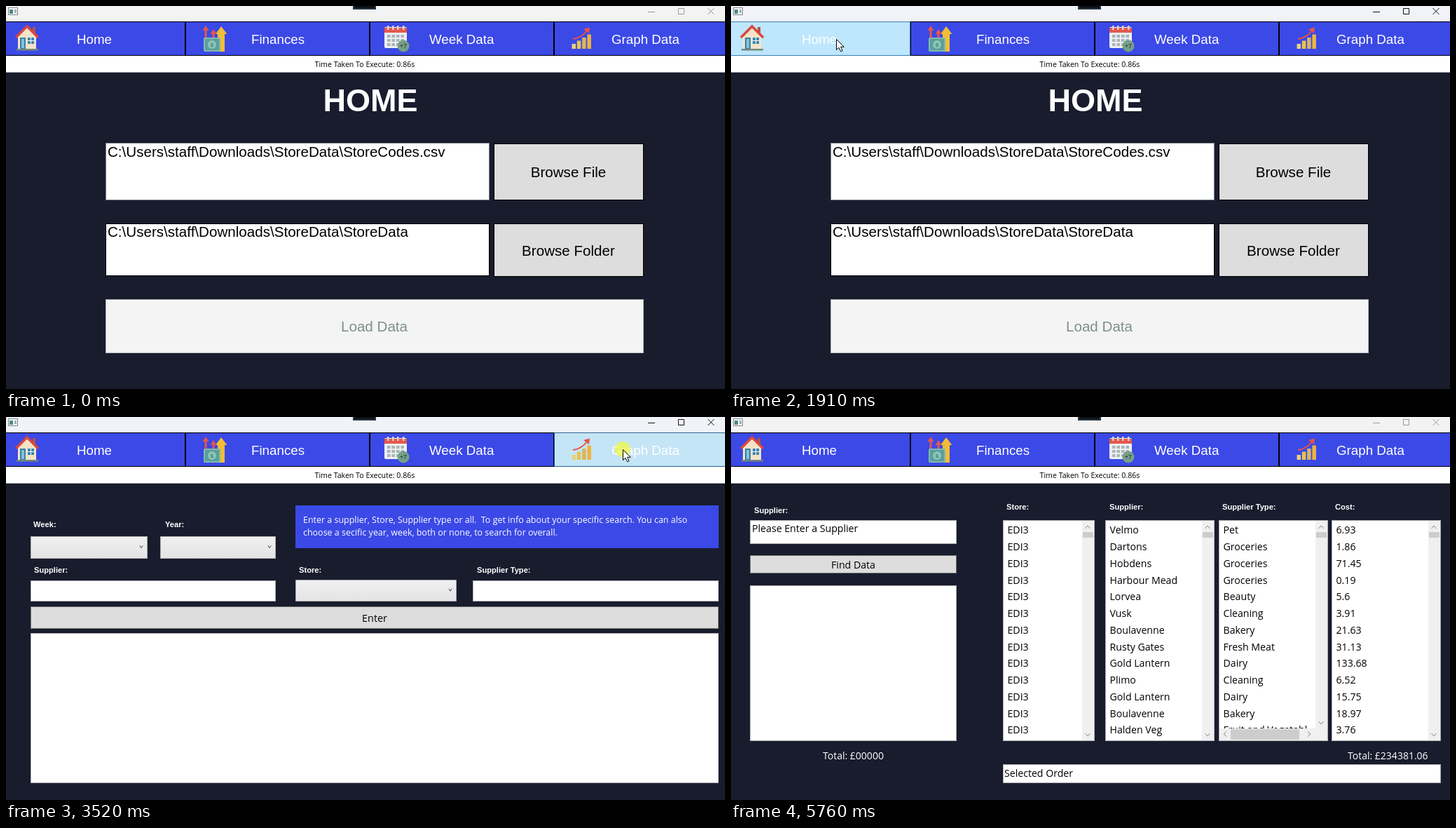
Write an HTML page that moves like this. It is 1026x546 px and loops after 5.82 s.

```html
<!DOCTYPE html>
<html lang="en">
<head>
<meta charset="utf-8">
<title>Store data app</title>
<style>
  html, body { margin: 0; width: 100%; height: 100%; overflow: hidden; background: #181c2d; }
  svg { display: block; }
  text { white-space: pre; }
  .ui { font-family: "Open Sans", "Noto Sans", sans-serif; }
  .arial { font-family: "Liberation Sans", Arial, sans-serif; }
  .bold { font-weight: bold; }
</style>
</head>
<body>
<svg id="stage" width="1026" height="546" viewBox="0 0 1026 546">
  <defs>
    <linearGradient id="combo" x2="0" y2="1">
      <stop stop-color="#f0f0f0"/><stop offset="1" stop-color="#e4e4e4"/>
    </linearGradient>
  </defs>
</svg>
<script>
const LOOP = 5820, STEPS = 88;
const BLUE = '#3b49e6', WHITE = '#fff', BLACK = '#000', GREY = '#ddd';
const stage = document.getElementById('stage');

// Drawing helpers: boxes take outer edges, text takes the middle of its capitals.
const fill = (x, y, w, h, color, extra = '') =>
  `<rect x="${x}" y="${y}" width="${w}" height="${h}" fill="${color}" ${extra}/>`;
const box = (x1, y1, x2, y2, color = WHITE, border = '#abadb3', extra = '') =>
  fill(x1 + .5, y1 + .5, x2 - x1 - 1, y2 - y1 - 1, color, `stroke="${border}" ${extra}`);
const path = (d, stroke, width = 1, color = 'none') =>
  `<path d="${d}" fill="${color}" stroke="${stroke}" stroke-width="${width}"/>`;
const shape = (d, color) => `<path d="${d}" fill="${color}"/>`;
const text = (x, y, string, size = 14.15, color = BLACK, style = 'ui', anchor = 'start') =>
  `<text x="${x}" y="${y}" dy=".36em" font-size="${size}" fill="${color}" class="${style}" text-anchor="${anchor}">${string}</text>`;
const arial = (x, y, string, size, color, anchor) => text(x, y, string, size, color, 'arial', anchor);
const label = (x, y, string) => text(x, y, string, 11.15, WHITE, 'arial bold');
const button = (x1, y1, x2, y2, string, size) =>
  box(x1, y1, x2, y2, GREY, '#707070') + text((x1 + x2) / 2, (y1 + y2) / 2 + 1, string, size, BLACK, 'ui', 'middle');
const chevron = (x, y, dx, dy, color = '#888', half = 3.5) => dx
  ? path(`M${x - dx / 2} ${y - half}l${dx} ${half}l${-dx} ${half}`, color)
  : path(`M${x - half} ${y - dy / 2}l${half} ${dy}l${half} ${-dy}`, color);
const combo = (x1, y1, x2, y2) =>
  box(x1, y1, x2, y2, 'url(#combo)', '#acacac') + chevron(x2 - 9, (y1 + y2) / 2 - 1, 0, 3.5, '#444', 2.2);
const note = (x1, y1, x2, y2, left, top, pitch, size, lines) =>
  fill(x1, y1, x2 - x1, y2 - y1, BLUE) +
  lines.map((line, i) => text(left, top + i * pitch, line, size, WHITE)).join('');

function list(x1, x2, rows, wide) {
  const bar = x2 - 18, bottom = wide ? 444 : 461;
  let out = box(x1, 147, x2, 462);
  rows.forEach((row, i) => out += text(x1 + 6.5, 161.3 + i * 23.75, row));
  out += fill(bar, 148, 17, bottom - 148, '#f0f0f0') + fill(bar + 1, 164, 15, 8, '#cdcdcd') +
    chevron(bar + 8, 157, 0, -4) + chevron(bar + 8, bottom - 8, 0, 4);
  if (wide) out += fill(x1 + 1, 444, x2 - x1 - 2, 17, '#f0f0f0') + fill(713, 445, 98, 15, '#cdcdcd') +
    chevron(705, 452, -4, 0) + chevron(825, 452, 4, 0);
  return out;
}

const icons = [
  shape('M17 43L30 30L43 43V62H17Z', '#f3e3c8') + fill(38, 30, 4, 9, '#b5524a') +
    path('M14 45L30 29L46 45', '#d9473f', 3.5) + fill(20, 45, 8, 16, '#3a7fa5') + fill(22, 47, 4, 13, '#7ec4dd') +
    fill(31, 45, 9, 9, '#3d86b0') + path('M35.5 45v9M31 49.5h9', WHITE) + fill(15, 61, 31, 2.5, '#75877d'),
  shape('M302 65V40h-3L307 29L315.5 40h-3.500V65Z', '#f2bd35') +
    shape('M283.5 45V35h-3L285 28L289.500 35h-3V45ZM294.500 45V40h-3L296 33L300.500 40h-3V45Z', '#e4574c') +
    fill(282, 45, 24, 20, '#7fb9ae', 'rx="2"') + fill(284, 47, 20, 16, '#5d9e9b') +
    '<circle cx="294" cy="55" r="6" fill="#8ac6b6"/>' + text(294, 55, '$', 8, '#2f6f78', 'arial', 'middle'),
  fill(540, 30, 32, 30, '#eceff2', 'rx="2"') + fill(540, 31, 32, 7, '#e4584c') +
    [544, 551, 558, 566].map(x => fill(x, 28, 2.5, 6, '#dfd3d0')).join('') +
    [0, 1, 2].map(r => [0, 1, 2, 3].map(c => fill(544 + c * 6.5, 41 + r * 6, 4.5, 4, '#a9b4b6')).join('')).join('') +
    '<circle cx="567" cy="57" r="8.500" fill="#76a088"/>' + text(567, 57, '+7', 9, '#1c2b2c', 'arial', 'middle'),
  ['#e8d27c', '#e9c34b', '#d9b565', '#efb43e'].map((color, i) =>
    fill(807.5 + i * 7.3, 54 - i * 4.5, 5.5, 7 + i * 4.5, color)).join('') +
    path('M809 47C818 46 824 42 830 34', '#e65348', 2) + shape('M824 33L833 30.500L832 39Z', '#e65348')
];
const tabs = [[-1, 256, 'Home', 101], [256, 519, 'Finances', 350], [519, 782, 'Week Data', 604], [782, 1027, 'Graph Data', 864]];
const header =
  '<rect id="title" width="1026" height="23"/>' +
  box(3, 2, 17, 13, '#f7f9fa', '#7d8790') + fill(5, 5, 5, 6, '#4b8c80') + fill(12, 5, 3, 5, '#a5b0b8') +
  fill(495, 0, 33, 5, '#263442') + fill(497, 0, 29, 3, '#0c1118') +
  '<g id="controls" fill="none"><path d="M916 8.500h10M959.500 3.500h8v8h-8zM1001.500 3l9 9M1010.500 3l-9 9"/></g>' +
  tabs.map(([x1, x2, name, x], i) =>
    box(x1, 22, x2, 71, BLUE, BLACK, `id="tab${i}"`) + icons[i] + arial(x, 47, name, 18.75, WHITE)).join('') +
  fill(0, 71, 1026, 23, WHITE) + fill(0, 94, 1026, 1, '#abadb3') +
  text(512, 83.5, 'Time Taken To Execute: 0.86s', 10.6, BLACK, 'ui', 'middle');

const folder = 'C:\\Users\\staff\\Downloads\\StoreData\\';
const hotBoxes = [
  [142, 195, 690, 277, '#707b80'], [142, 310, 690, 385, BLACK],
  [696, 196, 910, 277, BLACK, true], [696, 310, 910, 386, BLACK, true]
];
const home =
  text(520, 134, 'HOME', 45, WHITE, 'arial bold', 'middle') +
  hotBoxes.map(([x1, y1, x2, y2, border, isButton], i) =>
    box(x1, y1, x2, y2, isButton ? GREY : WHITE, border, `id="hot${i}"`)).join('') +
  arial(145, 208, folder + 'StoreCodes.csv', 20.6, BLACK) + arial(145, 322, folder + 'StoreData', 20.6, BLACK) +
  arial(802.5, 237, 'Browse File', 20.6, BLACK, 'middle') + arial(802.5, 348.5, 'Browse Folder', 20.6, BLACK, 'middle') +
  box(142, 418, 910, 495, '#f4f4f4', '#adb2b5') + arial(525.5, 457, 'Load Data', 20.6, '#7f9187', 'middle');

const suppliers = ['Velmo', 'Dartons', 'Hobdens', 'Harbour Mead', 'Lorvea', 'Vusk', 'Boulavenne', 'Rusty Gates',
  'Gold Lantern', 'Plimo', 'Gold Lantern', 'Boulavenne', 'Halden Veg'];
const types = ['Pet', 'Groceries', 'Groceries', 'Groceries', 'Beauty', 'Cleaning', 'Bakery', 'Fresh Meat',
  'Dairy', 'Cleaning', 'Dairy', 'Bakery', 'Fruit and Vegetabl'];
const costs = [6.93, 1.86, 71.45, 0.19, 5.6, 3.91, 21.63, 31.13, 133.68, 6.52, 15.75, 18.97, 3.76];
const finances =
  label(33, 133, 'Supplier:') + box(27, 147, 322, 181) + text(30, 158.5, 'Please Enter a Supplier') +
  button(27, 197, 322, 223, 'Find Data') + box(27, 240, 322, 462) + text(131, 483, 'Total: £00000', 14, WHITE) +
  label(393, 128, 'Store:') + label(540, 128, 'Supplier:') + label(701, 128, 'Supplier Type:') + label(862, 128, 'Cost:') +
  list(388, 519, suppliers.map(() => 'EDI3')) + list(534, 690, suppliers) + list(696, 852, types, true) + list(857, 1013, costs) +
  text(880, 483, 'Total: £234381.06', 14, WHITE) + box(388, 495, 1013, 522) + text(390, 507.5, 'Selected Order');

const week =
  label(39, 153, 'Week:') + label(227, 153, 'Year:') + combo(35, 170, 202, 202) + combo(220, 170, 385, 202) +
  note(413, 126, 1017, 187, 424, 147, 18, 12.47, [
    'Enter a supplier, Store, Supplier type or all.  To get info about your specific search. You can also',
    'choose a secific year, week, both or none, to search for overall.']) +
  label(40, 218, 'Supplier:') + label(418, 218, 'Store:') + label(672, 218, 'Supplier Type:') +
  box(35, 233, 385, 263) + combo(413, 232, 643, 263) + box(666, 233, 1017, 263) +
  button(35, 270, 1017, 302, 'Enter', 14.4) + box(35, 308, 1017, 522);

const ticks = ['0.08000000000000002', '0.06000000000000001', '0.04000000000000001', '0.020000000000000007',
  '6.938893903907228E-18', '-0.019999999999999993', '-0.039999999999999994', '-0.06', '-0.08', '-0.1'];
const tickY = i => Math.round(246 + i * 32.9) - .5;
const graph =
  label(26, 136, 'Store:') + label(198, 136, 'Week:') + label(373, 133, 'Year:') +
  combo(21, 149, 188, 178) + combo(192, 149, 360, 178) + combo(366, 149, 533, 178) + button(547, 149, 781, 178, 'Enter', 10.6) +
  ticks.map((tick, i) => path(`M150 ${tickY(i)}H781`, '#e8e8ec') +
    text(147, tickY(i) + .5, tick, 9.2, '#b4b5bb', 'ui', 'end')).join('') +
  [0, 1, 2, 3, 4].map(i => path(`M${Math.round(150 + i * 157.5) + .5} 212.5V542`, '#e8e8ec')).join('') +
  `<g transform="translate(36 377) rotate(-90)">${text(0, 0, 'Incom in £', 9.2, '#b4b5bb', 'ui', 'middle')}</g>` +
  note(800, 205, 1026, 299, 811, 222.5, 15, 10.65, ['The graph week axis (x), start at an',
    'index of 0. This means the week that', 'disaplys is actually plus 1. E.g week 0 is', 'actually week 1.']) +
  note(800, 315, 1026, 409, 811, 332.5, 15, 10.65, ['If you select nothing on the week or',
    'year drop down, it will show results', 'without a specific year or week.']);

const pages = { home, finances, week, graph };
stage.innerHTML += fill(0, 0, 1026, 546, '#181c2d') +
  Object.entries(pages).map(([name, content]) => `<g id="${name}">${content}</g>`).join('') + header +
  '<g id="cursor"><circle id="click" r="11" fill="#ffff00" fill-opacity=".55"/>' +
  path('M.5 .5V15.5L4 12.3L6.5 17.8L9 16.7L6.6 11.3H11.3Z', BLACK, 1, WHITE) + '</g>';

// Pointer stops as [step, x, y]; clicks as [first step, last step].
const route = [[2, 965, 536], [10, 440, 92], [12, 402, 56], [17, 395, 52], [20, 394, 51], [24, 150, 48], [28, 140, 47],
  [29, 150, 47], [33, 330, 46], [35, 343, 46], [37, 352, 46], [42, 605, 46], [45, 618, 46], [46, 620, 46],
  [51, 880, 46], [55, 880, 46], [60, 517, 57], [62, 423, 50], [67, 422, 49], [76, 422, 49], [82, 983, 542]];
const clicks = [[14, 14], [25, 26], [33, 33], [43, 43], [53, 54], [74, 75]];
const pageStarts = [[0, 'home'], [15, 'finances'], [27, 'home'], [34, 'finances'], [44, 'week'], [55, 'graph'], [76, 'finances']];

const byId = id => document.getElementById(id);
const setAttributes = (id, values) => {
  for (const name in values) byId(id).setAttribute(name, values[name]);
};
const show = (id, visible) => setAttributes(id, { display: visible ? 'inline' : 'none' });

function pointerAt(step) {
  const next = route.findIndex(stop => stop[0] >= step);
  if (next < 0 || step < route[0][0]) return null;
  if (next === 0) return route[0].slice(1);
  const [a, ax, ay] = route[next - 1], [b, bx, by] = route[next];
  const part = (step - a) / (b - a);
  return [ax + (bx - ax) * part, ay + (by - ay) * part];
}

function draw(time) {
  const step = Math.floor(time / LOOP * STEPS + .2) % STEPS;
  const pointer = pointerAt(step);
  const pressed = clicks.some(([from, to]) => step >= from && step <= to);
  const active = step >= 14 && step < 87;
  const page = pageStarts.filter(([start]) => start <= step).pop()[1];
  const over = (x1, y1, x2, y2) => pointer &&
    pointer[0] > x1 && pointer[0] < x2 && pointer[1] > y1 && pointer[1] < y2;

  for (const name in pages) show(name, name === page);
  setAttributes('title', { fill: active ? '#f1f3f9' : '#f3f3f3' });
  setAttributes('controls', { stroke: active ? '#111' : '#999' });
  tabs.forEach(([x1, x2], i) => {
    const hover = over(x1 + 3, 22, x2 - 3, 71);
    setAttributes('tab' + i, {
      fill: !hover ? BLUE : pressed ? '#c4e5f6' : '#bee6fd',
      stroke: !hover ? BLACK : pressed ? '#2c628b' : '#3c7fb1'
    });
  });
  hotBoxes.forEach(([x1, y1, x2, y2, border, isButton], i) => {
    const hover = over(x1, y1, x2, y2);
    setAttributes('hot' + i, {
      fill: !isButton ? WHITE : hover ? '#bee6fd' : GREY,
      stroke: !hover ? border : isButton ? '#3c7fb1' : '#7eb4ea'
    });
  });
  show('cursor', pointer);
  show('click', pressed);
  if (pointer) setAttributes('cursor', { transform: `translate(${pointer.map(Math.round).join(' ')})` });
}

function tick(now) {
  draw(now % LOOP);
  requestAnimationFrame(tick);
}
draw(0);
requestAnimationFrame(tick);
</script>
</body>
</html>
```
